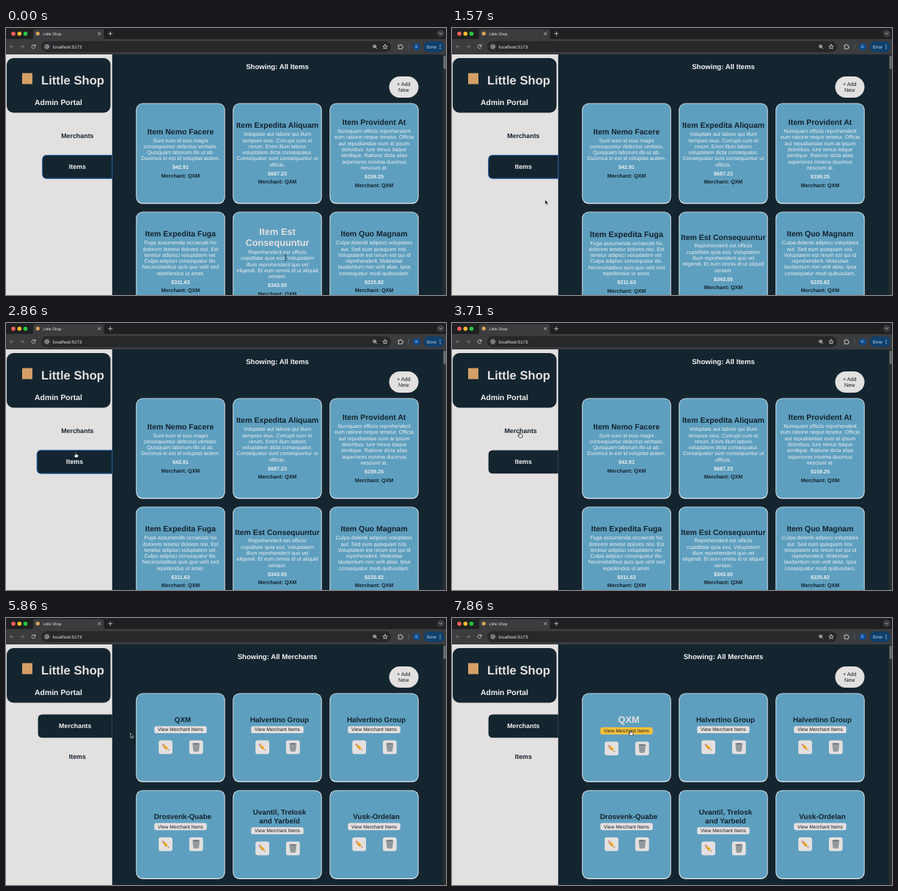
An HTML page for the animation above (8 s loop, 600 by 364 pixels).

```html
<!DOCTYPE html>
<html lang="en">
<head>
<meta charset="utf-8">
<title>Little Shop</title>
<style>
  html, body { margin: 0; width: 100%; height: 100%; overflow: hidden; background: #142530; }
  svg { display: block; width: 100%; height: 100%; }
  text { font-family: "Liberation Sans", Arial, sans-serif; text-rendering: geometricPrecision; white-space: pre; }
  .b { font-weight: bold; }
  .m { text-anchor: middle; }
  .line { fill: none; stroke: #d5d6d8; stroke-width: .8; stroke-linecap: round; stroke-linejoin: round; }
</style>
</head>
<body>
<svg viewBox="0 0 600 364" preserveAspectRatio="none">
  <defs>
    <g id="pencil" transform="rotate(45)">
      <rect x="-6.2" y="-1.6" width="2" height="3.2" rx=".8" fill="#e58a8c"/>
      <rect x="-4.4" y="-1.6" width="1.2" height="3.2" fill="#a9b0b5"/>
      <rect x="-3.2" y="-1.6" width="6.2" height="3.2" fill="#f3b229"/>
      <rect x="-3.2" y=".5" width="6.2" height="1.1" fill="#cf8420"/>
      <path d="M3-1.6 6.4 0 3 1.6z" fill="#eccb9b"/>
      <path d="M5.1-.6 6.6 0 5.1.6z" fill="#333"/>
    </g>
    <g id="bin">
      <path d="M-4.5-4.6H4.5L3.3 5.2Q0 6.2-3.3 5.2z" fill="#a3a8aa" stroke="#74797b" stroke-width=".5"/>
      <path d="M-2.6-3.6-1.8 5M0-3.6V5.2M2.6-3.6 1.8 5M-4-1.2H4M-3.7 1.6H3.7" stroke="#777d80" stroke-width=".5"/>
      <ellipse cy="-4.6" rx="4.9" ry="1.2" fill="#5d6366" stroke="#c0c4c5" stroke-width=".5"/>
    </g>
    <path id="arrow" d="M0 0V6.2L1.5 4.9 2.5 7.2 3.6 6.7 2.6 4.5H4.5z" fill="#050505" stroke="#eee" stroke-width=".6"/>
    <path id="beam" d="M-1.3-4Q0-4 0-3.2Q0-4 1.3-4M0-3.4V3.4M-1.3 4Q0 4 0 3.2Q0 4 1.3 4M-.7.9H.7" fill="none" stroke="#26343c" stroke-width=".7"/>
    <path id="hand" d="M-.7.4Q0-.5.7.4V2.7L3.1 3.2Q3.9 3.5 3.7 4.4L3 7.2H-.7L-2.7 4.4Q-2.6 3.4-1.6 3.8L-.7 4.6z" fill="#f7f7f7" stroke="#111" stroke-width=".7"/>
  </defs>

  <g id="page"></g>

  <g id="browser">
    <rect width="600" height="15.5" fill="#1f2022"/>
    <path d="M34 15.5Q37 15.5 37 12.5V4.5Q37 1.5 40 1.5H130.5Q133.5 1.5 133.5 4.5V12.5Q133.5 15.5 136.5 15.5z" fill="#3b3c3e"/>
    <rect y="15" width="600" height="21" fill="#3b3c3e"/>
    <circle cx="10" cy="7.7" r="2.8" fill="#fb5f57"/>
    <circle cx="18.3" cy="7.7" r="2.8" fill="#fdbc2e"/>
    <circle cx="26.5" cy="7.7" r="2.8" fill="#28c840"/>
    <circle cx="43.3" cy="7.6" r="2.6" fill="#d9a455"/>
    <text x="50.5" y="9.5" font-size="5.3" fill="#e4e5e7">Little Shop</text>
    <path class="line" d="M125.6 6 129 9.4M129 6 125.6 9.4M139.8 7.7H144.8M142.3 5.2V10.2"/>
    <circle cx="592.7" cy="7.5" r="5" fill="#3b3c3e"/>
    <path class="line" d="M590.9 6.7 592.7 8.4 594.5 6.7"/>
    <path class="line" d="M10.5 25.5H5.5M7.8 23.2 5.5 25.5 7.8 27.8M19.5 25.5H24.5M22.2 23.2 24.5 25.5 22.2 27.8" style="stroke:#77797c"/>
    <path class="line" d="M39.8 24.1A2.5 2.5 0 1 0 40 26.2M40 22.7V24.5H38.2"/>
    <rect x="48" y="18" width="477" height="15" rx="7.5" fill="#27282a"/>
    <circle cx="55.7" cy="25.5" r="4.8" fill="#3b3c3e"/>
    <g class="line">
      <circle cx="55.7" cy="25.5" r="2.4"/>
      <path d="M55.7 25.3V26.7M55.7 24.3V24.4"/>
      <circle cx="502.6" cy="25" r="2"/>
      <path d="M504.1 26.5 505.8 28.2M501.8 25H503.4M502.6 24.2V25.8"/>
      <path d="M517 22.5 517.9 24.6 520.1 24.8 518.4 26.2 519 28.4 517 27.2 515 28.4 515.6 26.2 513.9 24.8 516.1 24.6z"/>
      <path d="M535 23.7H536.8Q536.6 22.2 537.7 22.2T538.6 23.7H540.3V25.2Q541.7 25 541.7 26T540.3 26.9V28.5H535V26.9Q536.3 26.6 536.2 25.9T535 25z"/>
    </g>
    <text x="64" y="27.7" font-size="6.1" fill="#e8e9eb">localhost:5173</text>
    <path d="M549 21.5V29.5" stroke="#5a6470" stroke-width=".8"/>
    <circle cx="560" cy="25.6" r="4.7" fill="#0a4c94"/>
    <text class="m" x="560" y="27.4" font-size="5" fill="#e8f0fa">E</text>
    <rect x="569.5" y="18.3" width="28.5" height="14.7" rx="7.3" fill="#10406b"/>
    <text x="574" y="27.7" font-size="6" fill="#cfe4fb">Error</text>
    <g fill="#cfe4fb"><circle cx="592" cy="23.2" r=".7"/><circle cx="592" cy="25.6" r=".7"/><circle cx="592" cy="28" r=".7"/></g>
  </g>
  <use id="cursor"/>
</svg>

<script>
const LOOP = 8000, STEP = LOOP / 56;
const DARK = '#142530', LIGHT = '#e3e0e0', BLUE = '#5e9fbf', INK = '#13232e';
const MERCHANT = 'QXM', SWITCH = 3850, PRESS = 3690;
const COLUMNS = [177.5, 309.5, 441.5], CARD_W = 121, SIDE = 144.8;
const BIG = 12.7, LEADING = 1.15;

const items = [
  ['Item Nemo Facere', '$42.91', 'Sunt eum id eius magni|consequuntur delectus veritatis.|Quisquam laborum illo ut ab.|Ducimus in est id voluptas autem.'],
  ['Item Expedita Aliquam', '$687.23', 'Voluptate aut labore qui illum|tempore eius. Corrupti cum et|rerum. Enim illum labore|voluptatem dicta consequatur.|Consequatur sunt consequuntur ut|officiis.'],
  ['Item Provident At', '$159.25', 'Numquam officiis reprehenderit|eum ratione neque tenetur. Officia|aut repudiandae eum at ipsum|doloribus. Iure minus itaque|similique. Ratione dicta alias|asperiores minima ducimus|nesciunt at.'],
  ['Item Expedita Fuga', '$311.63', 'Fuga assumenda occaecati hic|dolorem tenetur dolores nisi. Est|tenetur adipisci voluptatem vel.|Culpa adipisci consequatur illo.|Necessitatibus quis quo velit sed|repellendus ut amet.', [1080, 1330]],
  ['Item Est|Consequuntur', '$343.55', 'Reprehenderit est officiis|cupiditate quia eos. Voluptatem|illum reprehenderit quo vel|eligendi. Et eum omnis id ut aliquid|veniam.', [-1000, 1040]],
  ['Item Quo Magnam', '$225.82', 'Culpa deleniti adipisci voluptates|aut. Sed eum quisquam nisi.|Voluptatem est rerum est qui id|reprehenderit. Molestiae|laudantium non velit alias. Ipsa|consequatur modi quibusdam.']
];
const merchants = [
  [MERCHANT, [5890, 9000]], ['Halvertino Group'], ['Halvertino Group'],
  ['Drosvenk-Quabe'], ['Uvantil, Trelosk|and Yarbeld'], ['Vusk-Ordelan']
];
// time, x, y
const path = [
  [0, 381, 313], [570, 381, 313], [860, 345, 312], [1040, 309, 310], [1140, 267, 309],
  [1330, 180, 275], [1710, 96.5, 211], [2000, 95.4, 208.4], [2430, 95.4, 208.4], [2860, 95, 176],
  [3140, 93, 150], [3710, 92.5, 149], [5290, 92.5, 147.5], [5640, 105, 151],
  [5860, 170.5, 157], [6140, 205, 159], [6570, 243.5, 153], [LOOP, 243.5, 153]
];

const clamp = v => Math.min(1, Math.max(0, v));
const mix = (a, b, p) => a + (b - a) * p;
const hovered = (t, span) => !!span && t >= span[0] && t < span[1];
const hoverAmount = (t, span) => span ? clamp((t - span[0]) / 300) - clamp((t - span[1]) / 300) : 0;

// Text centred on x and on the middle of its line.
const label = (x, y, size, fill, str, cls = 'm b') =>
  `<text class="${cls}" x="${x}" y="${y + size * .345}" font-size="${size}" fill="${fill}">${str}</text>`;
const box = (x, y, w, h, r, fill) =>
  `<rect x="${x}" y="${y}" width="${w}" height="${h}" rx="${r}" fill="${fill}"/>`;
const card = (x, y, h) => box(x - .2, y, CARD_W + .4, h + .3, 9, '#e9eef0')
  + box(x + .7, y + .7, CARD_W - 1.4, h - 1.6, 8.2, BLUE);

function titleLines(x, top, size, fill, lines) {
  return lines.map((s, i) => label(x, top + size * LEADING * (i + .5), size, fill, s)).join('');
}

function itemCard([title, price, text, span], i, t) {
  const x = COLUMNS[i % 3], y = i < 3 ? 102.5 : 250.5, cx = x + CARD_W / 2;
  const size = mix(10.5, BIG, hoverAmount(t, span));
  const heading = size > 10.75 ? title.split('|') : [title.replace('|', ' ')];
  const body = text.split('|'), lead = 8.28;
  const grow = (heading.length * size - 10.5) * LEADING / 2;
  const first = y + 63 - (body.length - 1) * lead / 2 + grow;
  const last = first + (body.length - 1) * lead;
  const top = first - 18 - grow * 2;
  return card(x, y, 137)
    + titleLines(cx, top, size, hovered(t, span) ? LIGHT : INK, heading)
    + body.map((s, k) => label(cx, first + k * lead, 7.2, '#eceff0', s, 'm')).join('')
    + label(cx, last + 12, 7.2, '#eceff0', price)
    + label(cx, last + 23.7, 7.2, INK, 'Merchant: ' + MERCHANT);
}

function merchantCard([title, span], i, t, pointer) {
  const x = COLUMNS[i % 3], y = i < 3 ? 102.5 : 234.7, cx = x + CARD_W / 2;
  const size = mix(9.8, BIG, hoverAmount(t, span)), heading = title.split('|');
  const grow = (heading.length * size - 9.8) * LEADING / 2;
  const view = y + 49.7 + grow, tools = y + 73.7 + grow;
  const lit = span && overView(pointer);
  const tool = (id, tx) => box(tx - 9.4, tools - 9.4, 18.8, 18.8, 3, LIGHT)
    + `<use href="#${id}" x="${tx}" y="${tools}"/>`;
  return card(x, y, 121)
    + titleLines(cx + 3, y + 30.3 - grow, size, hovered(t, span) ? LIGHT : INK, heading)
    + box(cx - 35.7, view - 4.8, 71.4, 9.6, 2.6, lit ? '#f5c13c' : LIGHT)
    + label(cx, view, 6.65, '#1b1b1b', 'View Merchant Items', 'm')
    + tool('pencil', cx - 20.4) + tool('bin', cx + 21.3);
}

function navButton(name, cy, active, focus, span, t) {
  const left = 49.7 - 7.5 * hoverAmount(t, span);
  const shape = `M${SIDE} ${cy - 15.9}H${left + 6}q-6 0-6 6v19.8q0 6 6 6H${SIDE}z`;
  const ring = focus ? 'stroke="#1f5fb0"' : '';
  return (active ? `<path d="${shape}" fill="${DARK}" ${ring}/>` : '')
    + label((left + 145) / 2, cy, 8.9, active ? '#f4f4f4' : INK, name);
}

function overView({x, y}) { return x > 203 && x < 274 && y > 148 && y < 159; }

function pointerAt(t) {
  const i = path.findIndex((p, k) => k && p[0] >= t);
  const [a, b] = [path[i - 1], path[i]], p = (t - a[0]) / (b[0] - a[0]);
  return { x: mix(a[1], b[1], p), y: mix(a[2], b[2], p) };
}

function pointerKind({x, y}, t) {
  const overNav = x > 45 && x < 145 && (y > 131 && y < 163 || y > 173 && y < 205);
  if (overNav || t > SWITCH && overView({x, y})) return 'hand';
  return t < SWITCH && x > 180 && y > 270 ? 'beam' : 'arrow';
}

function draw(t) {
  const pointer = pointerAt(t), onItems = t < SWITCH;
  const cards = onItems ? items.map((c, i) => itemCard(c, i, t))
                        : merchants.map((c, i) => merchantCard(c, i, t, pointer));
  page.innerHTML = box(0, 36, 600, 328, 0, DARK)
    + box(0, 36, SIDE, 328, 0, LIGHT)
    + box(1, 41, 141.5, 74.5, 9, DARK)
    + box(22, 61.5, 14, 15, 0, '#d5a067')
    + label(91, 71.5, 16.65, LIGHT, 'Little Shop')
    + label(71.5, 101.3, 10.45, '#f0efef', 'Admin Portal')
    + navButton('Merchants', 147.3, !onItems, false, [3020, 5800], t)
    + navButton('Items', 189.3, onItems, t < PRESS, [2500, 2900], t)
    + label(370, 52.2, 9.65, '#f5f5f5', 'Showing: All ' + (onItems ? 'Items' : 'Merchants'))
    + box(522.5, 66, 40, 29, 14.5, LIGHT)
    + label(542.3, 76.3, 7.2, '#1b1b1b', '+ Add', 'm')
    + label(542.3, 84.6, 7.2, '#1b1b1b', 'New', 'm')
    + cards.join('')
    + box(595.8, 36, 4.2, 328, 0, '#2a2d30')
    + box(596.6, 37.5, 3, 18.5, 1.5, '#717375');
  cursor.setAttribute('href', '#' + pointerKind(pointer, t));
  cursor.setAttribute('x', pointer.x);
  cursor.setAttribute('y', pointer.y);
}

const page = document.getElementById('page'), cursor = document.getElementById('cursor');
const start = performance.now();
let shown = -1;
function tick() {
  const step = Math.floor(((performance.now() - start) % LOOP + 4) / STEP) % 56;
  if (step !== shown) draw((shown = step) * STEP);
  requestAnimationFrame(tick);
}
tick();
</script>
</body>
</html>
```
